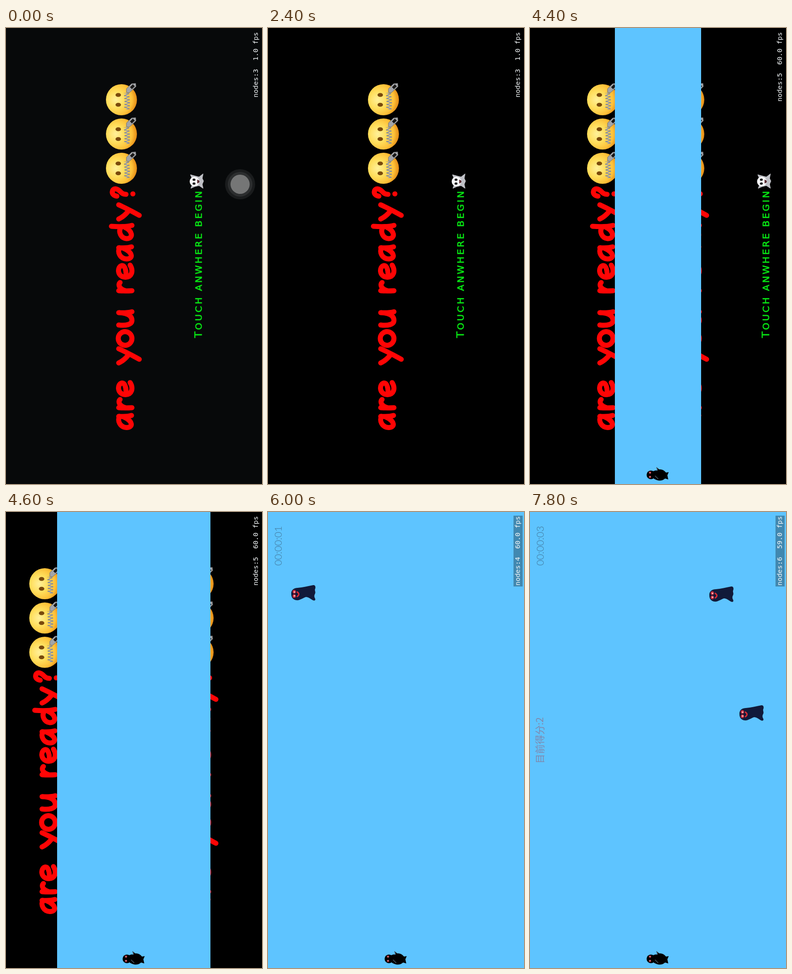
An HTML page that plays this animation: 561 px wide and 998 px high, repeating every 8000 ms.

```html
<!DOCTYPE html>
<html lang="en">
<head>
<meta charset="utf-8">
<title>Are you ready?</title>
<style>
  html, body { margin: 0; width: 100%; height: 100%; overflow: hidden; background: #000; }
  svg { display: block; width: 100vw; height: 100vh; }
  .ink { fill: none; stroke: #ff0505; stroke-width: 11; stroke-linecap: round; stroke-linejoin: round; }
  .begin { font: 20px "DejaVu Sans", sans-serif; letter-spacing: 3.9px; fill: #08e414; stroke: #08e414; stroke-width: .8px; }
  .begin .cap { font-size: 22px; }
  .hud { font: 14.85px "DejaVu Sans Mono", monospace; fill: #f4f8fa; text-anchor: end; white-space: pre; }
  .clock { font: 300 22px Lato, sans-serif; fill: #42789c; text-anchor: middle; }
  .score { font: 300 21px "Noto Sans CJK SC", "Noto Sans CJK", sans-serif; fill: #7f88ad; }
</style>
</head>
<body>
<svg viewBox="0 0 561 998" preserveAspectRatio="none">
  <defs>
    <radialGradient id="skin" cx=".5" cy=".32" r=".7">
      <stop offset="0" stop-color="#fff09a"/>
      <stop offset=".4" stop-color="#ffde5c"/>
      <stop offset=".75" stop-color="#fdc038"/>
      <stop offset="1" stop-color="#e0820f"/>
    </radialGradient>
    <clipPath id="leftHalf"><rect width="280" height="998"/></clipPath>
    <clipPath id="rightHalf"><rect x="280" width="281" height="998"/></clipPath>

    <g id="zipFace">
      <circle r="34" fill="url(#skin)"/>
      <g fill="#7a4a0c">
        <ellipse cx="-11" cy="-7" rx="4.3" ry="6"/>
        <ellipse cx="10.5" cy="-7" rx="4.3" ry="6"/>
      </g>
      <g fill="none" stroke="#8b8e95">
        <path d="M-21 14.500Q-4 17 15 13" stroke-width="6" stroke-dasharray="3 3.500"/>
        <path d="M-18 9Q-4 11 15 8" stroke-width="6" stroke-dasharray="3 3.500"/>
        <path d="M-22 12Q-4 14 15 10" stroke="#a4a6ab" stroke-width="2"/>
      </g>
      <path d="M35 22L36 31L29 32L15 17L16 11L24 11Z" fill="#a3a5a8" stroke="#6d6e70" stroke-linejoin="round"/>
      <rect x="-4.5" y="-3" width="9" height="6" fill="#191919" transform="translate(28.5 24) rotate(45)"/>
    </g>

    <path id="a" d="M148 249C139 243 124 250 123.500 264C123.500 279 138 279 147 257M148 247Q147 266 150 275"/>
    <path id="r" d="M167 247Q166 262 167 276M167 262C170 250 179 244 185 250"/>
    <path id="e" d="M197 263C211 264 222 260 221 254C219 243 196 243 195.500 262C196 277 211 279 222 272"/>
    <path id="y" d="M265 247Q270 258 281 267M296 247Q286 269 273 292"/>

    <g id="spook">
      <path d="M-12 -4L-16 -13L-8 -10H5L14 -14L11 -3L9 5L16 14L6 12L0 15L-7 12L-16 14L-10 5Z" fill="#bfc0c6" stroke="#bfc0c6" stroke-linejoin="round"/>
      <circle cx="-1" cy="-5" r="10.500" fill="#f6f6f8"/>
      <g fill="#111"><ellipse cx="-5.500" cy="-6" rx="2.500" ry="3.200"/><ellipse cx="3" cy="-6" rx="2.500" ry="3.200"/></g>
      <path d="M-5 1H3Q2 6 -1 6Q-4 6 -5 1" fill="#5c3036"/>
    </g>

    <g id="menu">
      <rect width="561" height="998"/>
      <g id="touch">
        <rect width="561" height="998" fill="#07090a"/>
        <g transform="translate(513 342)">
          <circle r="33" fill="#1a1c1d"/>
          <circle r="27" fill="#2c2e2f"/>
          <circle r="21" fill="#757676"/>
        </g>
      </g>
      <g transform="translate(0 998) rotate(-90)">
        <g class="ink" role="img" aria-label="are you ready?">
          <use href="#a"/><use href="#r"/><use href="#e"/>
          <use href="#y"/>
          <ellipse cx="318.500" cy="261" rx="15" ry="15"/>
          <path d="M348 247C346 263 349 276 358 276C369 276 375 264 375 247Q374 264 377 276"/>
          <use href="#r" x="256"/><use href="#e" x="257"/><use href="#a" x="369"/>
          <path d="M562 252C552 245 538 252 537 264C537 279 553 279 562 260M564 231Q562 260 566 276"/>
          <use href="#y" x="315"/>
          <path d="M630 243C631 230 646 230 646 240C645 251 634 250 634 263M635 278V278.100"/>
        </g>
        <use href="#zipFace" x="691" y="253"/>
        <use href="#zipFace" x="766" y="253"/>
        <use href="#zipFace" x="841" y="253"/>
        <text class="begin" x="320" y="429"><tspan class="cap">T</tspan>OUCH ANWHERE BEGIN</text>
        <use href="#spook" x="663" y="418"/>
      </g>
    </g>

    <g id="ghost">
      <path fill="#111a3a" d="M-26 3C-27 -7 -19 -11 -12 -11C0 -12 10 -15 22 -17C27 -18 28 -12 26 -8C25 -5 28 -2 26 2C24 5 24 9 26 12C28 16 25 18 21 16C16 13 12 9 6 9C-2 12 -8 17 -15 16C-22 15 -26 10 -26 3Z"/>
      <g fill="#c72c3c"><ellipse cx="-19.500" cy="-2.500" rx="3.600" ry="4"/><ellipse cx="-19.500" cy="7" rx="3.600" ry="4"/></g>
      <g fill="#f7dfe2"><circle cx="-19" cy="-2" r="1.600"/><circle cx="-19" cy="6.500" r="1.600"/></g>
      <path d="M-13 -2Q-6 3 -13 8" fill="none" stroke="#d92b35" stroke-width="3" stroke-linecap="round"/>
    </g>
  </defs>

  <rect width="561" height="998" fill="#5ec4ff"/>

  <g id="hero">
    <path d="M270 970Q276 967 279 969L277 961L283 966Q292 965 298 973L304 972L301 979L303 988L296 986Q289 992 280 990Q273 988 270 985Z"/>
    <circle cx="265" cy="978" r="9.500"/>
    <g fill="#a82a36"><circle cx="263" cy="973" r="2.500"/><circle cx="263" cy="982.500" r="2.500"/></g>
    <g fill="#f3d5d8"><circle cx="263" cy="973.500" r="1"/><circle cx="263" cy="982" r="1"/></g>
    <path d="M274 980L281 987M278 962L280 968" stroke="#4d5a64" stroke-width="1.500"/>
  </g>

  <g id="ghosts"></g>

  <g id="doors">
    <g id="leftDoor"><g clip-path="url(#leftHalf)"><use href="#menu"/></g></g>
    <g id="rightDoor"><g clip-path="url(#rightHalf)"><use href="#menu"/></g></g>
  </g>

  <g transform="translate(0 998) rotate(-90)">
    <rect id="hudBox" x="835" y="538" width="155" height="20" fill="#000" opacity=".31"/>
    <text id="hud" class="hud" x="989" y="552"></text>
    <text id="clock" class="clock" x="924" y="30"></text>
    <text id="score" class="score" x="447.500" y="29">目前得分:2</text>
  </g>
</svg>
<script>
  const LOOP = 8000, STEP = 200, SPEED = 0.26;
  const $ = id => document.getElementById(id);
  const clamp = (v, lo, hi) => Math.min(hi, Math.max(lo, v));
  const show = (el, on) => { el.style.display = on ? "" : "none"; };
  const move = (el, x, y) => el.setAttribute("transform", `translate(${x} ${y})`);

  // Each ghost keeps its lane and passes y at time `at`.
  const ghosts = [
    { x: 77, y: 177, at: 6000, end: 6800 },
    { x: 485, y: 440, at: 7800, end: LOOP },
    { x: 419, y: 180, at: 7800, end: LOOP }
  ];
  for (const g of ghosts) {
    g.el = document.createElementNS("http://www.w3.org/2000/svg", "use");
    g.el.setAttribute("href", "#ghost");
    $("ghosts").append(g.el);
  }

  const stats = [
    [0, "nodes:3  1.0 fps"],
    [4200, "nodes:5  60.0 fps"],
    [5000, "nodes:5  56.0 fps"],
    [5200, "nodes:4  60.0 fps"],
    [6400, "nodes:5  60.0 fps"],
    [7200, "nodes:6  59.0 fps"]
  ];

  function draw(t) {
    $("touch").setAttribute("opacity", clamp(1 - (t - 1000) / 1200, 0, 1));

    // Whole-pixel shifts keep the door edges sharp.
    const gap = t < 4200 ? 0 : Math.min(279.5, 20.5 + (t - 4200) * 0.36875);
    show($("doors"), t < 5200);
    move($("leftDoor"), -Math.floor(gap), 0);
    move($("rightDoor"), Math.ceil(gap), 0);

    for (const g of ghosts) {
      const y = g.y + (t - g.at) * SPEED;
      show(g.el, y > -20 && t < g.end && t >= 5200);
      move(g.el, g.x, y);
    }

    $("hud").textContent = stats.findLast(s => t >= s[0])[1];
    show($("hudBox"), t >= 5000);
    show($("clock"), t >= 5000);
    $("clock").textContent = "00:00:0" + Math.max(0, Math.floor((t - 4800) / 1000));
    show($("score"), t >= 6800);
  }

  const start = performance.now();
  function tick() {
    const t = (performance.now() - start) % LOOP;
    draw(Math.floor(t / STEP) * STEP);
    requestAnimationFrame(tick);
  }
  tick();
</script>
</body>
</html>
```
